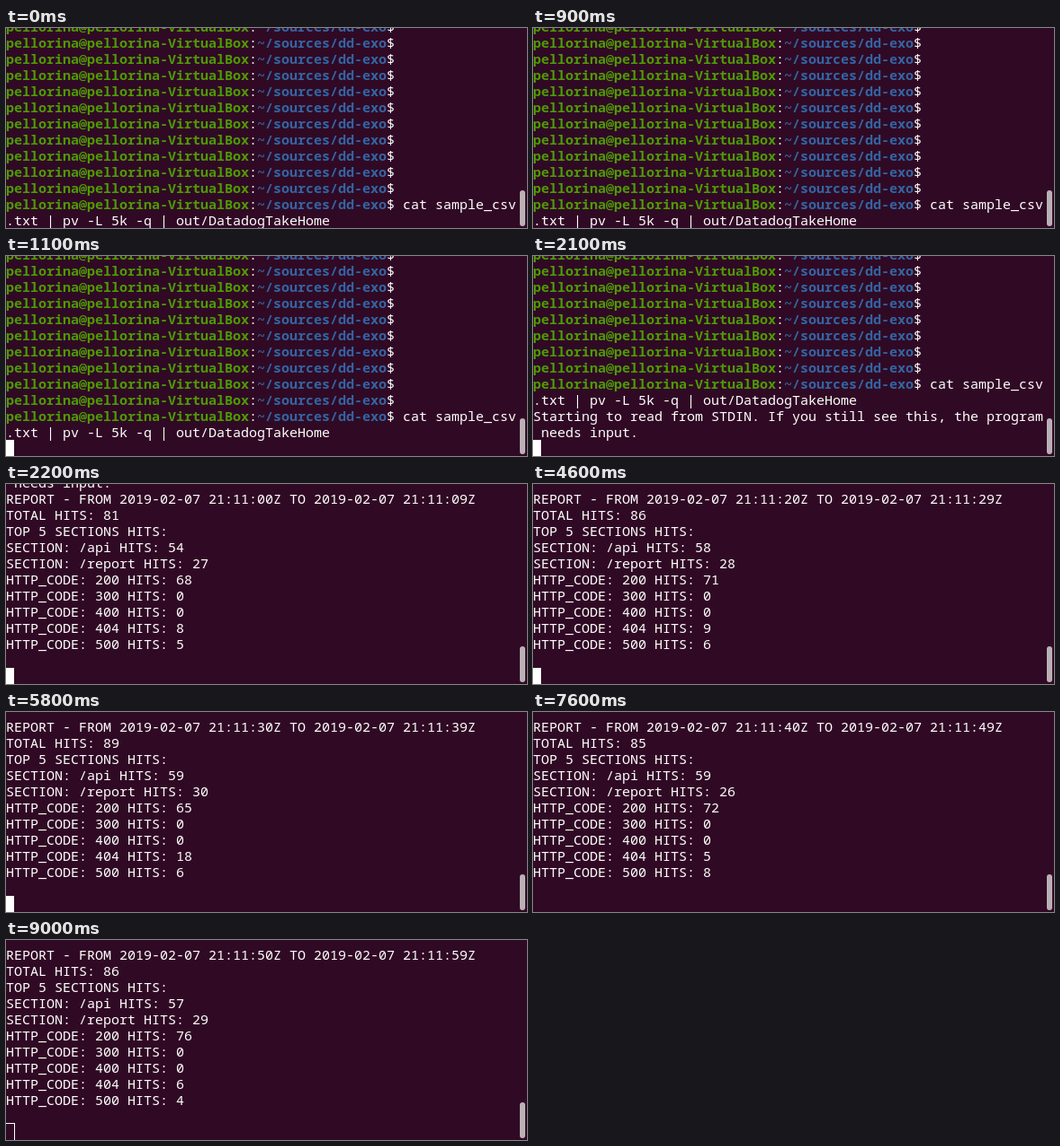
These frames come from a looping animation (579 by 223 pixels, 9.1 s). An HTML page:

```html
<!DOCTYPE html>
<html lang="en">
<head>
<meta charset="utf-8">
<title>Terminal log report</title>
<style>
  html, body { margin: 0; width: 100%; height: 100%; overflow: hidden; background: #300a24; }
  #term { position: relative; width: 579px; height: 223px; overflow: hidden; }
  #text {
    position: absolute; left: 0; top: -11px; margin: 0;
    font: 15px/18px "Noto Sans Mono", monospace;
    font-variant-ligatures: none;
    color: #fff; white-space: pre;
  }
  #text b { font-weight: 700; }
  .user { color: #4e9a06; }
  .path { color: #3465a4; }
  #cursor { position: absolute; top: 205px; width: 9px; height: 18px; }
  #cursor.solid { background: #fff; }
  #cursor.hollow { outline: 1px solid #fff; }
  #thumb {
    position: absolute; left: 571px; top: 181px; width: 6px; height: 40px;
    border-radius: 3px; background: #bab1b6;
  }
</style>
</head>
<body>
<div id="term">
  <pre id="text"></pre>
  <div id="cursor"></div>
  <div id="thumb"></div>
</div>
<script>
const LOOP = 9100, ROWS = 13, CELL = 9;
const text = document.getElementById('text');
const cursor = document.getElementById('cursor');

const prompt = '<b class="user">pellorina@pellorina-VirtualBox</b>:' +
  '<b class="path">~/sources/dd-exo</b>$ ';

const command = [
  ...Array(11).fill(prompt),
  prompt + 'cat sample_csv',
  '.txt | pv -L 5k -q | out/DatadogTakeHome'
];
const notice = [
  'Starting to read from STDIN. If you still see this, the program',
  ' needs input.'
];

// api hits, report hits, then codes 200, 404, 500
const counts = [
  [54, 27, 68, 8, 5],
  [56, 26, 69, 7, 6],
  [58, 28, 71, 9, 6],
  [59, 30, 65, 18, 6],
  [59, 26, 72, 5, 8],
  [57, 29, 76, 6, 4]
];

function report([api, rep, ok, missing, failed], i) {
  const stamp = unit => `2019-02-07 21:11:${i}${unit}Z`;
  const codes = [[200, ok], [300, 0], [400, 0], [404, missing], [500, failed]];
  return [
    `REPORT - FROM ${stamp(0)} TO ${stamp(9)}`,
    `TOTAL HITS: ${api + rep}`,
    'TOP 5 SECTIONS HITS:',
    `SECTION: /api HITS: ${api}`,
    `SECTION: /report HITS: ${rep}`,
    ...codes.map(([code, n]) => `HTTP_CODE: ${code} HITS: ${n}`),
    ''
  ];
}

// Screen contents after each output; the last row holds the cursor.
const screens = [command, [...command, '']];
let log = [...command];
for (const block of [notice, ...counts.map(report)]) {
  log = [...log, ...block];
  screens.push([...log, '']);
}
const views = screens.map(lines => lines.slice(-ROWS).join('\n'));

// [start ms, screen, cursor style]
const steps = [
  [0, 0, ''], [300, 0, 'hollow'], [900, 0, ''], [1000, 0, 'solid'],
  [1100, 1, 'solid'], [1200, 2, 'solid'], [1500, 2, ''], [2100, 2, 'solid'],
  [2200, 3, 'solid'], [2700, 3, ''],
  [3400, 4, 'solid'], [3900, 4, ''],
  [4600, 5, 'solid'], [5200, 5, ''],
  [5800, 6, 'solid'], [6400, 6, ''],
  [7000, 6, 'solid'], [7100, 7, 'solid'], [7600, 7, ''],
  [8200, 8, 'solid'], [8700, 8, ''], [9000, 8, 'hollow']
];

let shown = null;
function draw(step) {
  if (step === shown) return;
  const [, screen, style] = step;
  if (!shown || shown[1] !== screen) text.innerHTML = views[screen];
  cursor.className = style;
  cursor.style.left = (screen ? 0 : command.at(-1).length * CELL) + 'px';
  shown = step;
}

const begin = performance.now();
function tick() {
  const t = (performance.now() - begin) % LOOP;
  draw(steps.findLast(([start]) => start <= t));
  requestAnimationFrame(tick);
}
tick();
</script>
</body>
</html>
```
